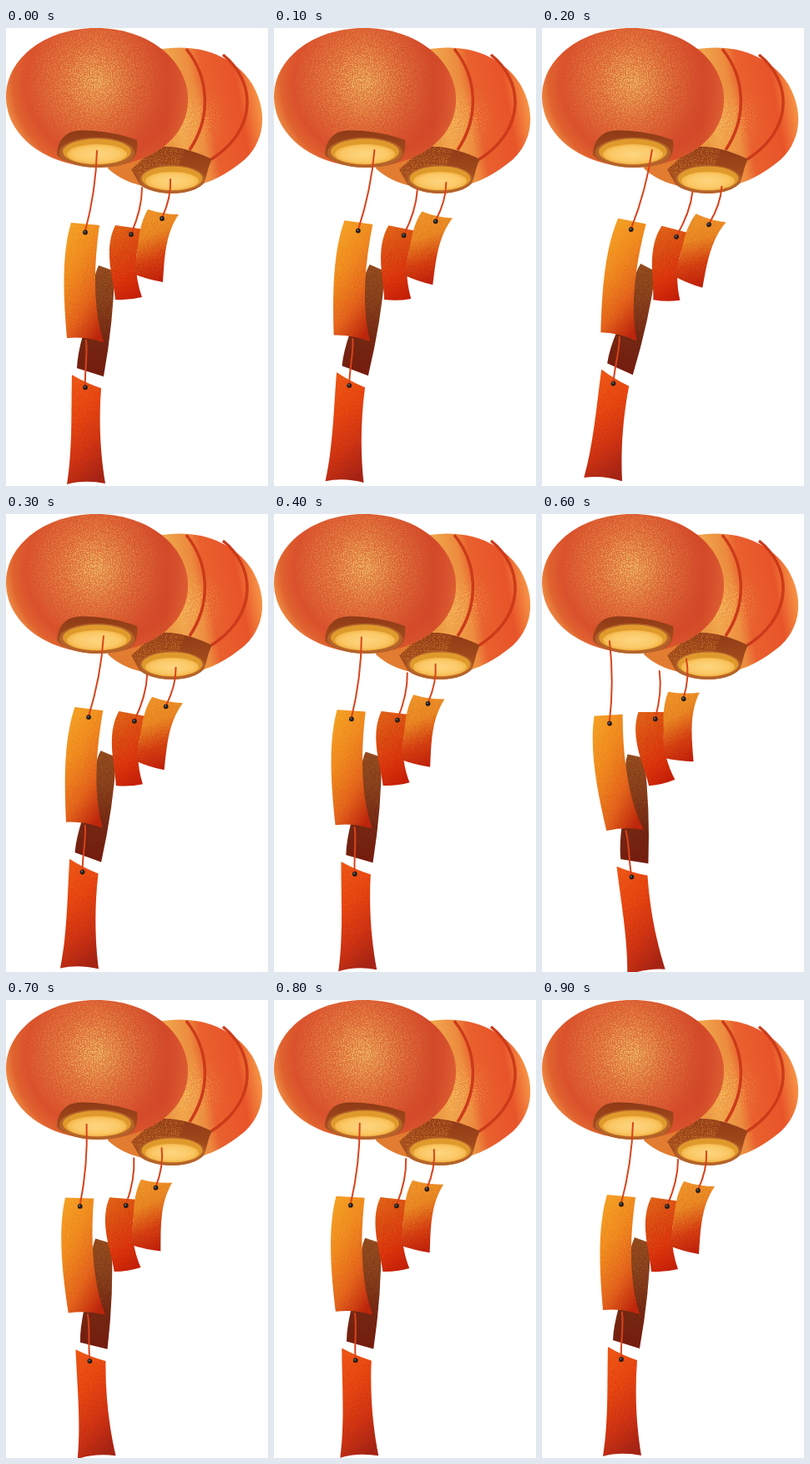
Animation of 314x548 px, one loop 1000 ms. Source, as an HTML page:

```html
<!DOCTYPE html>
<html lang="en">
<head>
<meta charset="utf-8">
<title>Swinging lanterns</title>
<style>
html, body { margin: 0; width: 100%; height: 100%; overflow: hidden; background: #fff; }
svg { display: block; width: 314px; height: 548px; }
.string { fill: none; stroke: #d8431c; stroke-width: 2; stroke-linecap: round; }
.rib { fill: none; stroke: #cc3a1a; stroke-width: 3.5; }
</style>
</head>
<body>
<svg viewBox="0 0 314 548">
  <defs>
    <filter id="grain" x="0" y="0" width="1" height="1" color-interpolation-filters="sRGB">
      <feTurbulence type="fractalNoise" baseFrequency=".65" numOctaves="2" seed="4"/>
      <feColorMatrix values="0 0 0 0 0  0 0 0 0 0  0 0 0 0 0  0 0 0 6 -2.8" result="dots"/>
      <feComposite in="SourceGraphic" in2="dots" operator="in"/>
    </filter>
    <path id="round" d="M0 82C0 36 48 0 108 0C170 0 218 38 218 86C218 133 170 166 110 166C48 166 0 129 0 82Z"/>
    <path id="back" d="M180 26.5C232 16 275 35 295 67C313 98 312 133 286 157.500C270 171 254 180.500 237 186L165 189C149 186 134 179 122 168L150 80Z"/>
    <radialGradient id="left" gradientUnits="userSpaceOnUse" cx="114" cy="66" r="120">
      <stop offset="0" stop-color="#e28a48"/><stop offset=".4" stop-color="#dc6435"/>
      <stop offset=".75" stop-color="#d9502c"/><stop offset=".88" stop-color="#e0622f"/>
      <stop offset="1" stop-color="#f09448"/>
    </radialGradient>
    <linearGradient id="shade">
      <stop offset=".5" stop-color="#cd4226" stop-opacity="0"/>
      <stop offset=".88" stop-color="#cd4226" stop-opacity=".6"/>
      <stop offset="1" stop-color="#da5a34" stop-opacity=".6"/>
    </linearGradient>
    <radialGradient id="glow" gradientUnits="userSpaceOnUse" cx="105" cy="62" r="88">
      <stop offset="0" stop-color="#f3c470"/><stop offset=".45" stop-color="#f0ac58" stop-opacity=".55"/>
      <stop offset="1" stop-color="#f0a050" stop-opacity="0"/>
    </radialGradient>
    <linearGradient id="right" gradientUnits="userSpaceOnUse" x1="165" y1="118" x2="307" y2="92">
      <stop offset="0" stop-color="#e27c30"/><stop offset=".3" stop-color="#f0a44a"/>
      <stop offset=".47" stop-color="#ec8a3e"/><stop offset=".56" stop-color="#e9602e"/>
      <stop offset=".82" stop-color="#e85429"/><stop offset="1" stop-color="#f79a48"/>
    </linearGradient>
    <radialGradient id="glow2" gradientUnits="userSpaceOnUse" cx="215" cy="110" r="50">
      <stop offset="0" stop-color="#f8c468"/><stop offset="1" stop-color="#f4a850" stop-opacity="0"/>
    </radialGradient>
    <radialGradient id="light">
      <stop offset="0" stop-color="#fdd680"/><stop offset=".75" stop-color="#fbc866"/><stop offset="1" stop-color="#f4b64a"/>
    </radialGradient>
    <linearGradient id="rim" x1="0" y1="0" x2="0" y2="1">
      <stop offset="0" stop-color="#8f3a17"/><stop offset=".5" stop-color="#9f481b"/><stop offset="1" stop-color="#b8642a"/>
    </linearGradient>
  </defs>

  <use href="#back" fill="url(#right)"/>
  <use href="#back" fill="url(#glow2)" filter="url(#grain)"/>
  <path class="rib" d="M216 25C243 58 247 106 220 146M260 32C298 62 304 120 246 157"/>
  <path fill="url(#rim)" d="M150 169C165 158 172 144 188 142C207 141 231 149 247 157C242 165 241 177 237 186C223 201 176 202 160 187Z"/>
  <path fill="#d9852f" opacity=".5" filter="url(#grain)" d="M150 169C165 158 172 144 188 142C196 142 206 144 214 147L207 166L160 178Z"/>
  <g id="rightMouth">
    <ellipse cx="199" cy="181" rx="39" ry="17" fill="#b5632a"/>
    <ellipse cx="199" cy="180" rx="36.500" ry="14.500" fill="#e09a2c"/>
    <ellipse cx="199" cy="183" rx="32" ry="11" fill="url(#light)"/>
  </g>

  <use href="#round" fill="url(#left)"/>
  <use href="#round" fill="url(#shade)"/>
  <use href="#round" fill="url(#glow)" filter="url(#grain)"/>
  <path fill="url(#rim)" d="M61 149C62 136 70 125 84 123C108 121 137 127 157 134C158 143 157 150 153 156C142 171 77 171 61 152Z"/>
  <g id="leftMouth">
    <ellipse cx="109" cy="149" rx="45" ry="18" fill="#b5632a"/>
    <ellipse cx="109" cy="148" rx="41" ry="15.500" fill="#e09a2c"/>
    <ellipse cx="109" cy="151" rx="36" ry="12" fill="url(#light)"/>
  </g>

  <g id="swing"></g>
</svg>
<script>
const swing = document.getElementById("swing");
const defs = document.querySelector("defs");

function gradient(id, colors, tilt) {
  const stops = colors.map((c, i) =>
    `<stop offset="${i / (colors.length - 1)}" stop-color="${c}"/>`).join("");
  defs.insertAdjacentHTML("beforeend",
    `<linearGradient id="${id}" x1="${.5 - tilt}" y1="0" x2="${.5 + tilt}" y2="1">${stops}</linearGradient>`);
}

function strip(id, d, colors, tilt, speck) {
  gradient(id, colors, tilt);
  gradient(id + "Dots", [speck, speck + "80", speck + "00"], tilt);
  return `<path d="${d}" fill="url(#${id})"/>
    <path d="${d}" fill="url(#${id}Dots)" filter="url(#grain)" opacity=".5"/>`;
}

const string = d => `<path class="string" d="${d}"/>`;
const hole = (x, y) => `<circle cx="${x}" cy="${y}" r="2.9" fill="#241c1c"/>
  <circle cx="${x - .6}" cy="${y - .7}" r="1" fill="#77706f"/>`;

swing.innerHTML =
  strip("dark", "M111 284L130 291Q129 350 117 417L85 407C86 382 96 357 101 334C104 316 104 299 111 284Z",
    ["#8e451b", "#823a19", "#702411", "#751c0e"], 0, "#a8642a") +
  strip("middle", "M131 236L166 241C153 266 153 294 163 322Q147 326 131 325C129 300 116 266 131 236Z",
    ["#dd5a14", "#d8430f", "#d8300b", "#c41f08"], .15, "#e87a20") +
  strip("long", "M78 233L112 236C105 285 104 335 117 376Q95 369 73 371C69 325 66 273 78 233Z",
    ["#f39c20", "#ee841c", "#e2601a", "#bd260c"], .25, "#f5ac34") +
  strip("low", "M79 415Q96 425 114 431C111 470 113 510 119 545Q94 540 73 546C80 502 78 455 79 415Z",
    ["#ec5012", "#e4400f", "#cc3012", "#a52314"], .15, "#ee6a1c") +
  strip("short", "M170 217Q188 223 207 223C190 248 190 277 188 304Q170 301 152 294C160 267 156 241 170 217Z",
    ["#ec8e24", "#e6801f", "#d2390f", "#bd1d08"], .12, "#f4aa3c") +
  string("M109 147C108 182 103 213 95 243") + hole(95, 244.5) +
  string("M163 191C163 212 157 230 150 246") + hole(150, 247) +
  string("M197 181C198 199 193 214 187 227") + hole(187, 228) +
  string("M96 374C98 392 94 410 95 429") + hole(95, 430);

// Swing angle in degrees, one pose per tenth of the loop
const angles = [0, 3.3, 6.6, 2.3, -1.2, -4.7, -8.2, -3.6, -1.8, 0];

function draw(now) {
  const pose = Math.floor(now % 1000 / 100);
  swing.setAttribute("transform", `rotate(${angles[pose]} 131 345)`);
  requestAnimationFrame(draw);
}
draw(0);
</script>
</body>
</html>
```
